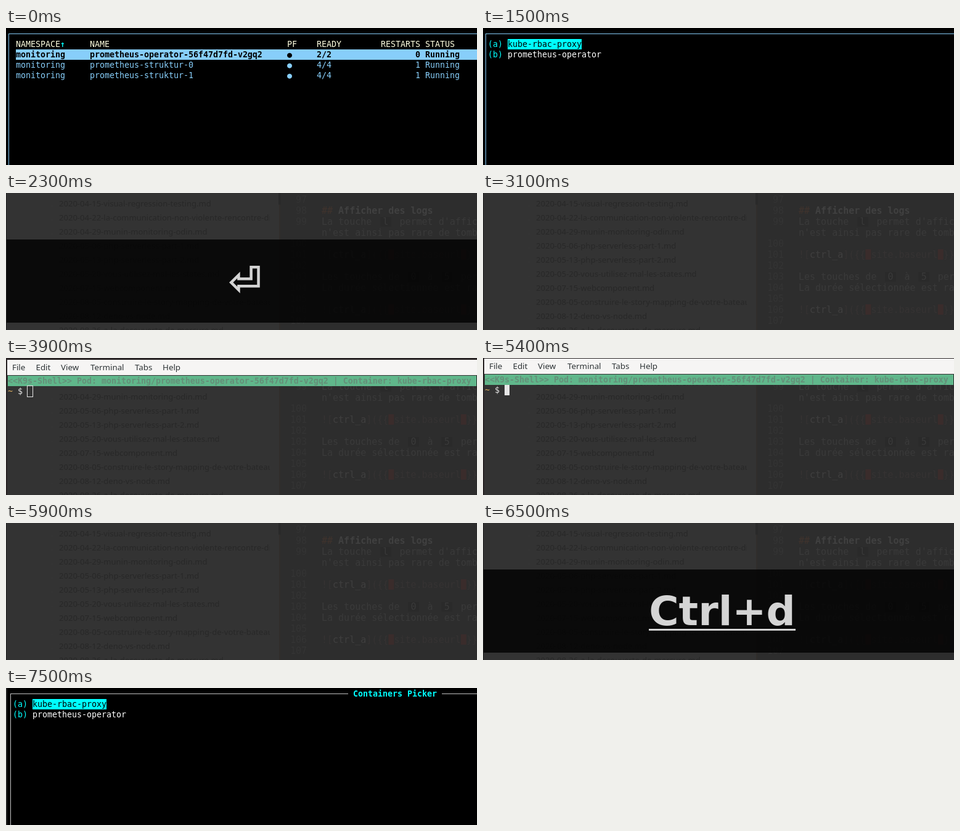
Animation, 764 px wide and 224 px high, one loop 8.1 s. Source, as an HTML page with a canvas:

```html
<!DOCTYPE html>
<html lang="en">
<head>
<meta charset="utf-8">
<title>Shell in a container</title>
<style>
html, body { margin: 0; width: 100%; height: 100%; overflow: hidden; background: #000; }
canvas { display: block; }
</style>
</head>
<body>
<canvas id="stage" width="764" height="224"></canvas>
<script>
const W = 764, H = 224, LOOP = 8100, CELL = 8, ROW = 17;
const ctx = document.getElementById('stage').getContext('2d');

const MONO = '"DejaVu Sans Mono", monospace';
const TERM = '13.29px ' + MONO;
const TERM_BOLD = 'bold ' + TERM;
const CODE = '15px ' + MONO;
const SKY = '#87cefa', AQUA = '#00ffff';

const POD = 'prometheus-operator-56f47d7fd-v2gq2';
const PODS = [
  [POD, '2/2', '0'],
  ['prometheus-struktur-0', '4/4', '1'],
  ['prometheus-struktur-1', '4/4', '1']
];
const POSTS = [
  '04-15-visual-regression-testing',
  '04-22-la-communication-non-violente-rencontre-di',
  '04-29-munin-monitoring-odin',
  '05-06-php-serverless-part-1',
  '05-13-php-serverless-part-2',
  '05-20-vous-utilisez-mal-les-states',
  '07-15-webcomponent',
  '08-05-construire-le-story-mapping-de-votre-bateau',
  '08-12-deno-vs-node',
  '08-26-a-la-decouverte-de-mercure'
];
const IMAGE = '![ctrl_a]({{ site.baseurl }}';
const ARTICLE = [
  ['97', ''],
  ['98', '## Afficher des logs'],
  ['99', "La touche `l` permet d'affic"],
  ['', "n'est ainsi pas rare de tomb"],
  ['100', ''],
  ['101', IMAGE],
  ['102', ''],
  ['103', 'Les touches de `0` à `5` per'],
  ['104', 'La durée sélectionnée est ra'],
  ['105', ''],
  ['106', IMAGE],
  ['107', '']
];
const MENU = [['File', 10], ['Edit', 48.5], ['View', 89], ['Terminal', 137], ['Tabs', 209], ['Help', 254]];

// Key presses: label and start time
const KEYS = [['s', 500], ['⏎', 2100], ['Ctrl+d', 6500]];

// Window height offsets and pointer places, one per 100 ms tick
const DROP = [-48, -31, -15, -4, 2, 5, 5, 3, 0];
const LIFT = [-16, -42];
const POINTER = [[264, -5], [214, -2], [158, -1], [93, -7]];

function rect(x, y, w, h, color) {
  ctx.fillStyle = color;
  ctx.fillRect(x, y, w, h);
}

function text(str, x, y, color, font) {
  if (font) ctx.font = font;
  ctx.fillStyle = color;
  ctx.fillText(str, x, y);
}

function drawPods() {
  rect(0, 0, W, H, '#000');
  rect(4, 9, W, 1, SKY);
  rect(4, 9, 1, H, SKY);
  const head = [['NAMESPACE', 16], ['NAME', 136], ['PF', 456], ['READY', 504], ['RESTARTS', 608], ['STATUS', 680]];
  ctx.font = TERM;
  for (const [label, x] of head) text(label, x, 31, '#ffffe0');
  text('↑', 88, 31, AQUA, TERM_BOLD);
  PODS.forEach(([name, ready, restarts], i) => {
    const y = 35 + i * ROW, color = i ? SKY : '#000';
    if (!i) rect(16, y, W, ROW, SKY);
    ctx.font = i ? TERM : TERM_BOLD;
    const cells = [['monitoring', 16], [name, 136], ['●', 456], [ready, 504], [restarts, 664], ['Running', 680]];
    for (const [str, x] of cells) text(str, x, y + 13, color);
  });
}

function drawPicker(dx, titled) {
  const line = titled ? '#c4c4c4' : SKY;
  rect(0, 0, W, H, '#000');
  if (titled) rect(0, 0, 2, H, '#262626');
  rect(4 + dx, 9, W, 1, line);
  rect(4 + dx, 9, 1, H, line);
  if (titled) {
    rect(555, 5, 152, 10, '#000');
    text('Containers Picker', 563, 14, AQUA, TERM_BOLD);
  }
  rect(40 + dx, 18, 15 * CELL, ROW, AQUA);
  text('(a)', 8 + dx, 31, AQUA, TERM);
  text('kube-rbac-proxy', 40 + dx, 31, '#000');
  text('(b)', 8 + dx, 48, AQUA);
  text('prometheus-operator', 40 + dx, 48, '#fff');
}

function drawCode(line, y) {
  const x = 512, step = 9.03;
  if (line === IMAGE) {
    for (const col of [12, 25]) rect(x + col * step, y - 14, 9, 17, '#3a2c2b');
    text(line, x, y, '#363333', CODE);
    text('ctrl_a', x + 2 * step, y, '#3e3e3e');
  } else if (line.startsWith('##')) {
    text('##', x, y, '#3c322d', 'bold ' + CODE);
    text(line.slice(3), x + 3 * step, y, '#404040');
  } else {
    line.split('`').reduce((col, part, i) => {
      const px = x + col * step;
      if (i % 2) rect(px - 4, y - 13, step + 8, 16, '#2a2a2a');
      text(part, px, y, '#3a3a3a', CODE);
      return col + part.length + 1;
    }, 0);
  }
}

// Editor seen dimly through the transparent terminal
function drawEditor() {
  rect(0, 0, W, H, '#333');
  ctx.save();
  ctx.beginPath();
  ctx.rect(0, 0, 428, H);
  ctx.clip();
  POSTS.forEach((post, i) => {
    const y = 21.5 + i * 23;
    text('↓', 70, y, '#363636', '10px "DejaVu Sans", sans-serif');
    text('2020-' + post + '.md', 86, y, '#282828', '13.05px "Noto Sans", sans-serif');
  });
  ctx.restore();
  rect(443, 0, W, H, '#2d2d2d');
  rect(442, 0, 4, 19, '#2a2a2a');
  rect(443, 19, 2, H, '#302d2b');
  ARTICLE.forEach(([num, line], i) => {
    const y = 16 + i * 18;
    ctx.textAlign = 'right';
    text(num, 488, y, '#343434', CODE);
    ctx.textAlign = 'left';
    drawCode(line, y);
  });
  rect(0, 0, 1, H, '#232323');
}

function drawShell(y, focused) {
  const frame = '#292425';
  rect(0, 0, 2, H, frame);
  rect(0, 0, W, Math.max(0, y + 1), frame);
  rect(2, y + 1, W, 25, '#f6f5f4');
  ctx.font = '13.33px "Noto Sans", sans-serif';
  for (const [label, x] of MENU) text(label, x, y + 18, '#2e3436');
  rect(2, y + 26, W, 1, '#333');
  rect(3, y + 27, W - 4, ROW, '#60b78b');
  text('<<K9s-Shell>> Pod: monitoring/' + POD + ' | Container: kube-rbac-proxy', 3, y + 40, '#658f79', TERM_BOLD);
  text('~', 3, y + 57, '#e0b060', TERM);
  text('$', 19, y + 57, '#e4e4e4');
  if (focused) {
    rect(35, y + 44, 8, ROW, '#e6e6e6');
  } else {
    ctx.strokeStyle = '#e6e6e6';
    ctx.lineWidth = 1;
    ctx.strokeRect(34.5, y + 43.5, 9, 18);
  }
}

function drawPointer(x, y) {
  const shape = [[0, 0], [0, 15], [4, 12], [7, 17], [9, 16], [7, 11], [11, 11]];
  ctx.beginPath();
  for (const [px, py] of shape) ctx.lineTo(x + px + 0.5, y + py);
  ctx.closePath();
  ctx.fillStyle = '#000';
  ctx.strokeStyle = '#fff';
  ctx.lineWidth = 1;
  ctx.fill();
  ctx.stroke();
}

// Key display: underlined for 200 ms, gone after one second
function drawKey(label, age) {
  ctx.save();
  ctx.globalAlpha = 0.8;
  rect(1, 76, W, 136, '#000');
  ctx.globalAlpha = 1;
  ctx.font = 'bold 66px "DejaVu Sans", sans-serif';
  const w = ctx.measureText(label).width, x = 388 - w / 2;
  text(label, x, 167, '#d4d4d4');
  if (age < 200) rect(Math.round(x), 173, Math.round(w), 3, '#d4d4d4');
  ctx.restore();
}

function draw(time) {
  const t = Math.floor(time / 100) * 100;
  if (t < 600) drawPods();
  else if (t < 2100) drawPicker(0, false);
  else if (t < 6600) {
    drawEditor();
    if (t >= 3500 && t < 5900) {
      const y = t < 5700 ? DROP[Math.min((t - 3500) / 100, DROP.length - 1)] : LIFT[(t - 5700) / 100];
      drawShell(y, t >= 5400);
    }
  } else {
    drawPicker(3, true);
    const spot = POINTER[(t - 6900) / 100];
    if (spot) drawPointer(...spot);
  }
  for (const [label, start] of KEYS) {
    if (t >= start && t < start + 1000) drawKey(label, t - start);
  }
}

const begin = performance.now();
function tick() {
  draw((performance.now() - begin) % LOOP);
  requestAnimationFrame(tick);
}
tick();
</script>
</body>
</html>
```
